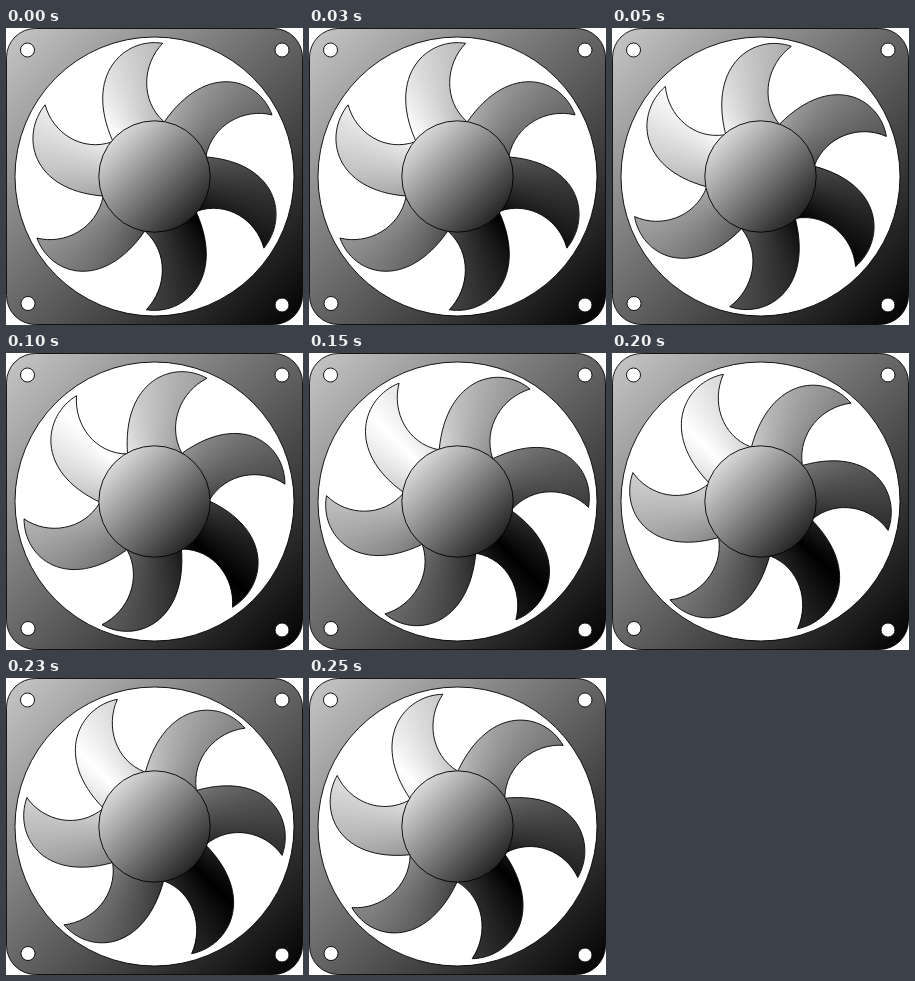
An HTML page with a canvas that plays this animation: 297 by 297 pixels, repeating every 0.3 s.

```html
<!DOCTYPE html>
<html lang="en">
<head>
<meta charset="utf-8">
<title>Fan</title>
<style>
  html, body { margin: 0; width: 100%; height: 100%; overflow: hidden; background: #fff; }
  canvas { display: block; width: 297px; height: 297px; }
</style>
</head>
<body>
<canvas id="fan"></canvas>
<script>
const SIZE = 297, MID = 148.5, HUB = 55.7;
const BLADES = 6, STEP_MS = 50, STEPS = 6;
const PITCH = 360 / BLADES;
const LEAD = -0.6;  // resting angle of the rotor, degrees
const AXIS = -65;   // long axis of the slightly oval rotor, degrees

const canvas = document.getElementById('fan');
const ctx = canvas.getContext('2d');
const dpr = window.devicePixelRatio || 1;
canvas.width = canvas.height = Math.round(SIZE * dpr);
ctx.scale(dpr, dpr);

function diagonal(from, to, light, dark) {
  const g = ctx.createLinearGradient(from, from, to, to);
  g.addColorStop(0, light);
  g.addColorStop(1, dark);
  return g;
}

function circle(x, y, r) {
  const p = new Path2D();
  p.arc(x, y, r, 0, Math.PI * 2);
  return p;
}

function paint(path, fill) {
  ctx.fillStyle = fill;
  ctx.fill(path);
  ctx.stroke(path);
}

const plate = new Path2D();
plate.roundRect(0.5, 0.5, SIZE - 1, SIZE - 1, 29);
const plateFill = diagonal(0, SIZE, '#c8c8c8', '#000');
const opening = circle(MID, MID, 139.5);
const screws = [[21.5, 22], [276, 22], [22, 275.5], [276, 277]].map(([x, y]) => circle(x, y, 7));
const hub = circle(MID, MID, HUB);
const hubFill = diagonal(MID - HUB, MID + HUB, '#fff', '#000');

const blade = new Path2D('M157 15C118 8 76 45 106 112L158 93.5C134 72 136 36 157 15Z');

// The light stays fixed while the blades turn through it.
const sheen = ctx.createConicGradient(Math.PI * 1.25, MID, MID);
[[0, '#fff'], [0.25, '#7e7e7e'], [0.5, '#000'], [0.75, '#7e7e7e'], [1, '#fff']]
  .forEach(([at, color]) => sheen.addColorStop(at, color));

function bladesAt(angle) {
  const all = new Path2D();
  for (let i = 0; i < BLADES; i++) {
    const turn = new DOMMatrix()
      .translate(MID, MID)
      .rotate(AXIS).scale(1.001, 0.977).rotate(-AXIS)
      .rotate(LEAD + angle + i * PITCH)
      .translate(-MID, -MID);
    all.addPath(blade, turn);
  }
  return all;
}

function draw(time) {
  const step = Math.floor((time + 0.01) / STEP_MS) % STEPS;
  ctx.clearRect(0, 0, SIZE, SIZE);
  ctx.strokeStyle = '#000';
  ctx.lineWidth = 0.9;
  paint(plate, plateFill);
  paint(opening, '#fff');
  screws.forEach(s => paint(s, '#fff'));
  paint(bladesAt(step * PITCH / STEPS), sheen);
  paint(hub, hubFill);
}

function tick() {
  draw(performance.now());
  requestAnimationFrame(tick);
}
tick();
</script>
</body>
</html>
```
